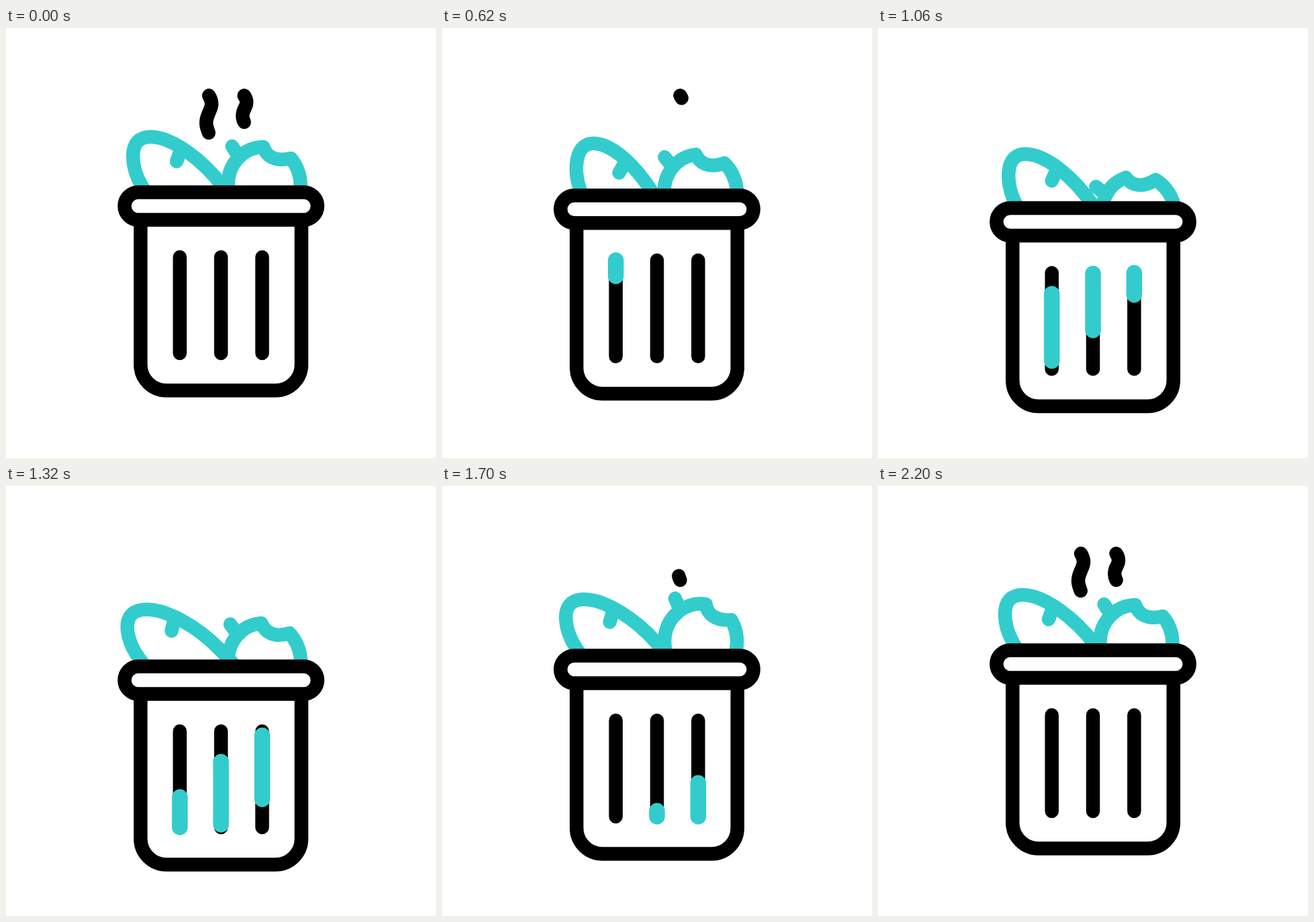
An HTML page for the animation above (2400 ms loop, 640 by 640 pixels).

```html
<!DOCTYPE html>
<html lang="en">
<head>
<meta charset="utf-8">
<title>Trash can</title>
<style>
  html, body { margin: 0; height: 100%; overflow: hidden; background: #fff; }
  svg { display: block; width: 100vw; height: 100vh; }
  path, rect { fill: none; stroke: #000; stroke-width: 20.5; stroke-linecap: round; stroke-linejoin: round; }
  .food path { stroke: #3cc; }
  .fill { stroke: #3cc; stroke-width: 23.5; }
  #lid { fill: #fff; }
</style>
</head>
<body>
<svg viewBox="0 0 640 640">
  <clipPath id="above"><path d="M0 0H640V265H0Z"/></clipPath>
  <path id="smokeL" pathLength="1" d="M302 100.5C310 114 304 120 301 128.5C296 140 298 146 301.7 156"/>
  <path id="smokeR" pathLength="1" d="M354.5 100.5C359.5 108 358.5 113 356 118C351 127 351 133 354.5 140"/>
  <g id="bin">
    <g class="food" clip-path="url(#above)">
      <g id="bread">
        <path d="M218 262L201.5 234C193 219 189 204 189 191C189 172 198 162 215 162C248 162 294 198 322 235L341 261"/>
        <path d="M260 182L254 198.5"/>
      </g>
      <g id="apple">
        <path d="M350 278C338 265 330.5 250 330.5 232C330.5 203 353 177.5 383 177C387 190 400 200 424 194C434 206 438.5 220 438.5 235C438.5 255 430 268 420 278"/>
        <path d="M336.5 176L345 189"/>
      </g>
    </g>
    <path d="M200.3 290V501a38.5 38.5 0 0 0 38.5 38.5H401.2a38.5 38.5 0 0 0 38.5-38.5V290"/>
    <rect id="lid" x="176.4" y="244.4" width="287.2" height="41" rx="20.5"/>
    <path d="M258.7 341V484M320 341V484M381.3 341V484"/>
    <path class="fill" pathLength="1" d="M258.7 341V484"/>
    <path class="fill" pathLength="1" d="M320 341V484"/>
    <path class="fill" pathLength="1" d="M381.3 341V484"/>
  </g>
</svg>
<script>
const LOOP = 2400;
const $ = id => document.getElementById(id);
const fills = document.querySelectorAll('.fill');

// Eased progress from time a to time b
function ease(t, a, b) {
  const x = Math.min(1, Math.max(0, (t - a) / (b - a)));
  return x * x * (3 - 2 * x);
}

// Swing to one angle, then to the other, then back to rest
function swing(t, start, first, second) {
  const step = 600;
  return first * ease(t, start, start + step)
    + (second - first) * ease(t, start + step, start + 2 * step)
    - second * ease(t, start + 2 * step, start + 3 * step);
}

// Show only the part of a path between two fractions
function trim(path, from, to) {
  const length = to - from;
  path.style.visibility = length > 1e-5 ? 'visible' : 'hidden';
  path.setAttribute('stroke-dasharray', `${length} 3`);
  path.setAttribute('stroke-dashoffset', -from);
}

function smoke(path, t, vanish, appear) {
  if (t < 1200) trim(path, 0, 1 - ease(t, vanish, vanish + 400));
  else trim(path, 1 - ease(t, appear, appear + 400), 1);
}

function draw(now) {
  const t = now % LOOP;
  const drop = 25.6 * (ease(t, 400, 1200) - ease(t, 1200, 2000));
  $('bin').setAttribute('transform', `translate(0 ${drop})`);
  $('bread').setAttribute('transform', `rotate(${swing(t, 200, 13.4, -8)} 193 257)`);
  $('apple').setAttribute('transform', `rotate(${swing(t, 400, -19, 10)} 445 232)`);
  fills.forEach((bar, i) => {
    const local = t - 200 * i;
    trim(bar, ease(local, 820, 1620), ease(local, 420, 1200));
  });
  smoke($('smokeL'), t, 100, 1800);
  smoke($('smokeR'), t, 300, 1600);
  requestAnimationFrame(draw);
}
draw(performance.now());
</script>
</body>
</html>
```
